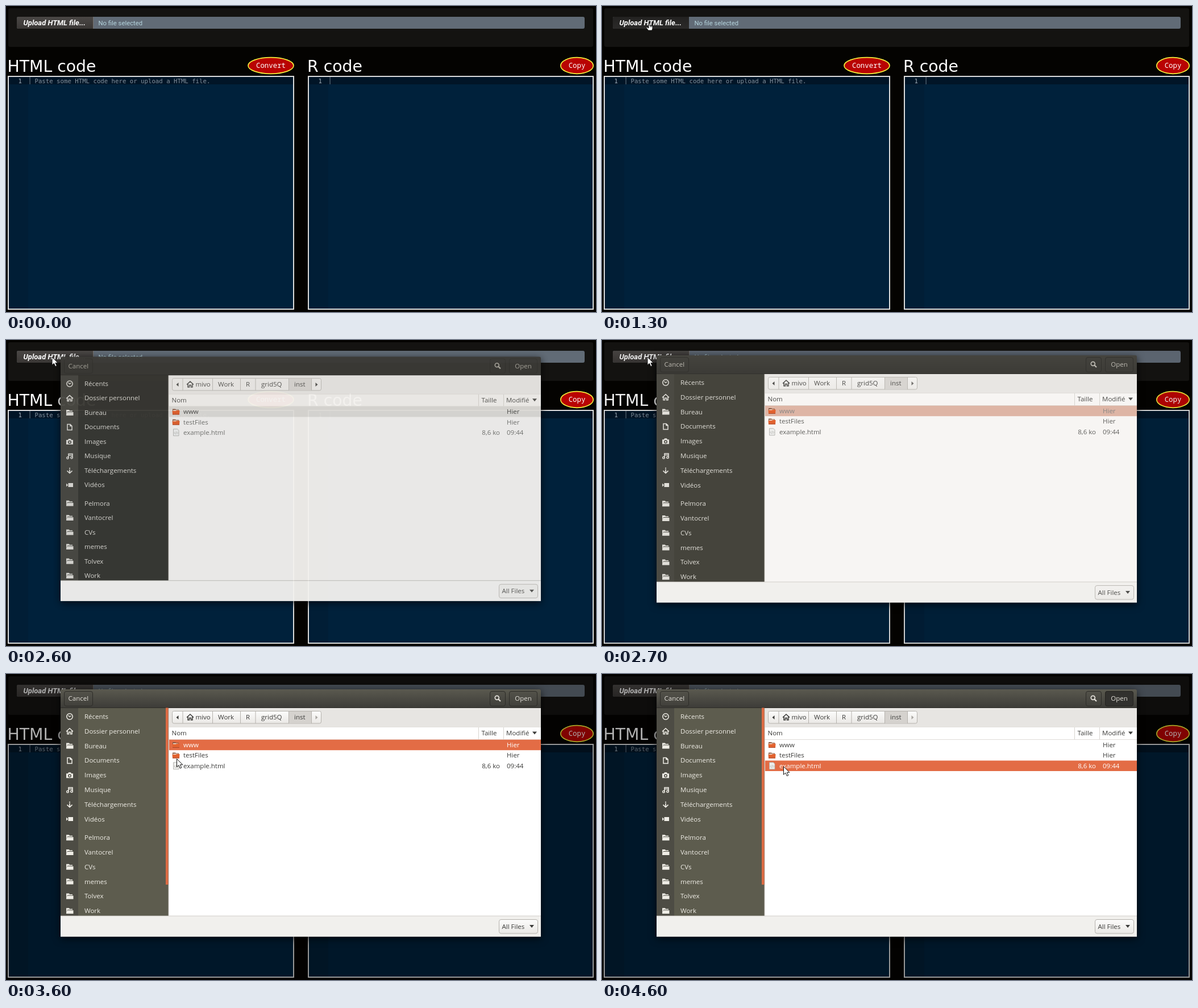
An HTML page that plays this animation: 1038x539 px, repeating every 8 s.

```html
<!DOCTYPE html>
<html lang="en">
<head>
<meta charset="utf-8">
<title>Upload a file</title>
<style>
html, body { margin: 0; width: 100%; height: 100%; overflow: hidden; background: #040301; }
svg { display: block; width: 100vw; height: 100vh; }
text { white-space: pre; }
.ui { font: 11.5px "Open Sans", "Noto Sans", sans-serif; }
.title { font: 28.3px "DejaVu Sans", sans-serif; fill: #fff; }
.code { font: 10.7px "DejaVu Sans Mono", monospace; }
.pill { font: 12.4px "Noto Sans Mono", monospace; fill: #fff; text-anchor: middle; }
.file { font: 11.3px Roboto, sans-serif; fill: #b4d3dc; }
.upload { font: italic bold 13px Roboto, sans-serif; fill: #fff; }
</style>
</head>
<body>
<svg id="stage" viewBox="0 0 1038 539" preserveAspectRatio="none"></svg>
<script>
const LOOP = 8000, STEP = 100;

const rect = (x, y, w, h, fill, more = '') =>
  `<rect x="${x}" y="${y}" width="${w}" height="${h}" fill="${fill}" ${more}/>`;
const text = (x, y, s, cls, more = '') => `<text x="${x}" y="${y}" class="${cls}" ${more}>${s}</text>`;
const path = (d, more = '') => `<path d="${d}" ${more}/>`;
const at = (x, y, body) => `<g transform="translate(${x} ${y})">${body}</g>`;
const gradient = (id, top, bottom) =>
  `<linearGradient id="${id}" x2="0" y2="1"><stop stop-color="${top}"/><stop offset="1" stop-color="${bottom}"/></linearGradient>`;

// ---- page ----
function editor(x, w, hint) {
  return rect(x + 1, 124, w - 2, 410, '#00213b', 'stroke="#dcdcdc" stroke-width="2"') +
    rect(x + 2, 125, 34, 408, '#011e36') +
    rect(x + 2, 125, w - 4, 13, '#011527') +
    text(x + 18.5, 135.5, '1', 'code', 'fill="#a3b0bc"') +
    rect(x + 38.5, 125, 1.2, 13, '#5b6a78') +
    text(x + 47.5, 135.5, hint, 'code', 'fill="#84919e"');
}

function pill(cx, rx, label) {
  return `<ellipse cx="${cx}" cy="105" rx="${rx}" ry="14.3" fill="#b90303" stroke="#f4ee3c" stroke-width="1.7"/>` +
    text(cx, 109.3, label, 'pill');
}

function page() {
  const left = 'M22 19H153V40H22Q19 40 19 37V22Q19 19 22 19Z';
  return rect(0, 0, 1038, 539, '#040301') +
    rect(4, 4, 1029, 68, '#141311', 'rx="3"') +
    rect(19, 19, 999, 21, '#616b76', 'rx="3"') +
    path(left, 'fill="url(#btn)"') +
    path(left, 'fill="url(#btnHover)" id="hover"') +
    rect(153, 19, 1, 21, '#756f69', 'id="seam"') +
    text(30.5, 34, 'Upload HTML file...', 'upload') +
    text(162.5, 33.8, 'No file selected', 'file') +
    text(2.5, 116, 'HTML code', 'title') + text(530, 116, 'R code', 'title') +
    pill(466, 40, 'Convert') + pill(1004.5, 28.7, 'Copy') +
    editor(3, 504, 'Paste some HTML code here or upload a HTML file.') +
    editor(531, 503, '');
}

// ---- icons, centred on 0,0 ----
const stroked = (d, w = 1.5) => path(d, `fill="none" stroke="currentColor" stroke-width="${w}"`);
const solid = d => path(d, 'fill="currentColor" fill-rule="evenodd"');
const icons = {
  clock: '<circle r="5.2" fill="none" stroke="currentColor" stroke-width="1.5"/>' + stroked('M-2.5 -2L0 .5L2.5 -1.5', 1.3),
  home: stroked('M-6 .5L0 -5L6 .5M-4 -1V5H-1.5V1.5H1.5V5H4V-1'),
  folder: solid('M-6 -5H-1L0 -3.5H5V-2H-4L-6 3ZM-4 -1H6.5V5H-6V3Z'),
  doc: stroked('M-4 -5H1L4 -2V5H-4ZM1 -5V-2H4'),
  camera: solid('M-6 -3H-3L-2 -5H2L3 -3H6V5H-6ZM0 -2A3 3 0 1 0 0 4A3 3 0 1 0 0 -2ZM0 -.5A1.5 1.5 0 1 1 0 2.5A1.5 1.5 0 1 1 0 -.5Z'),
  music: stroked('M-2 3V-4H5V2.5M-2 -1.5H5') +
    '<circle cx="-3.5" cy="3.3" r="1.8" fill="none" stroke="currentColor" stroke-width="1.4"/><circle cx="3.5" cy="2.8" r="1.8" fill="none" stroke="currentColor" stroke-width="1.4"/>',
  down: stroked('M0 -5V-3M0 -2V4M-4.5 .5L0 4.7L4.5 .5', 1.7),
  video: solid('M-2.5 -3.5H6V3.5H-2.5ZM-6 -3L-2.8 0L-6 3Z'),
  search: '<circle cx="-1.2" cy="-1.2" r="3.5" fill="none" stroke="currentColor" stroke-width="1.7"/>' + stroked('M1.5 1.5L5 5', 2.2)
};
const icon = (name, x, y, color) => at(x, y, `<g color="${color}">${icons[name]}</g>`);

const folderIcon = path('M-6 -5H-1L0 -4H5V4H-6Z', 'fill="#8c5a45"') + rect(-5, -3, 9, 3, '#f6e2d0') +
  path('M-6.5 -1.5H0L1 -2.5H6.5L6 5H-6Z', 'fill="#e2622f"') + rect(-6, 4, 12, 1, '#a8482b');
const fileIcon = path('M-4.5 -6H2.5L5 -3.5V6H-4.5Z', 'fill="#eeeeec" stroke="#aaa8a4" stroke-width=".8"') +
  stroked('M-1.5 -1L-3 1L-1.5 3M2 -1L3.5 1L2 3M.8 -1.5L-.3 3.5', .7);

const places = [
  ['clock', 'Récents'], ['home', 'Dossier personnel'], ['folder', 'Bureau'], ['doc', 'Documents'],
  ['camera', 'Images'], ['music', 'Musique'], ['down', 'Téléchargements'], ['video', 'Vidéos'],
  ...['Pelmora', 'Vantocrel', 'CVs', 'memes', 'Tolvex', 'Work'].map(s => ['folder', s])
];
const files = [['www', '', 'Hier'], ['testFiles', '', 'Hier'], ['example.html', '8,6 ko', '09:44']];

const active = {
  head: 'url(#head)', headText: '#e4e1da', edge: '#2d2c28', face: 'url(#face)', strip: '#4d4c44', side: '#5d5c4e',
  sideText: '#efede6', bar: '#e7e5e2', list: '#ffffff', foot: '#f1f0ed', ink: '#3b3b39', rowInk: '#3b3b39',
  pick: '#e36c45', pickInk: '#ffffff', button: 'url(#light)', chosen: '#d5d2ce', line: '#b5b2ad', dim: '#aaa7a2'
};
const inactive = {
  head: '#3b3a36', headText: '#a9a69d', edge: '#353430', face: '#3b3a36', strip: '#4a4943', side: '#393833',
  sideText: '#dbd9d3', bar: '#e9e7e4', list: '#f3f1ee', foot: '#f2f1ee', ink: '#5b5a57', rowInk: '#747370',
  pick: '#dcdad6', pickInk: '#4b4a47', button: '#eeece9', chosen: '#dad7d3', line: '#c0bdb8', dim: '#5b5a57'
};

function fileRow(i, c, picked) {
  const y = 125 + i * 18.4, [name, size, date] = files[i];
  const ink = `fill="${picked ? c.pickInk : c.rowInk}"`;
  return (picked ? rect(287, y - 9.3, 654, 18.5, c.pick) : '') +
    at(299, y, `<g color="#aaa8a4">${i < 2 ? folderIcon : fileIcon}</g>`) +
    text(312, y + 4, name, 'ui', ink) +
    text(869, y + 4, size, 'ui', ink + ' text-anchor="end"') + text(881, y + 4, date, 'ui', ink);
}

const fileRows = (c, pick) => files.map((_, i) => fileRow(i, c, i === pick)).join('');

function sidebar(c) {
  return rect(96, 59.5, 190, 366.5, c.side) + rect(96, 59.5, 31, 366.5, c.strip) +
    places.map(([name, label], i) => {
      const y = 75 + i * 25.8 + (i > 7 ? 6.8 : 0);
      return icon(name, 112, y, c.sideText) + text(138, y + 4, label, 'ui', `fill="${c.sideText}"`);
    }).join('');
}

function headButton(x, w, body, c, id = '') {
  return rect(x + .5, 30.5, w - 1, 26, c.face, `rx="3.5" stroke="${c.edge}" ${id}`) + body;
}

function header(c, id) {
  const label = (x, s) => text(x, 47.2, s, 'ui', `fill="${c.headText}" text-anchor="middle"`);
  return path('M96 59.5V30Q96 27 99 27H938Q941 27 941 30V59.5Z', `fill="${c.head}"`) +
    rect(96, 59, 845, 1, c.edge) +
    headButton(102, 51, label(127.3, 'Cancel'), c) +
    headButton(851, 28, icon('search', 865, 43, c.headText), c) +
    headButton(885, 50, '', c) +
    rect(885.5, 30.5, 49, 26, '#32312e', `rx="3.5" stroke="#252420" opacity="0" ${id}`) + label(910, 'Open');
}

function pathBar(c) {
  const ink = `fill="${c.ink}"`;
  const crumbs = [[333.5, 'mivo'], [373, 'Work'], [422, 'R'], [449, 'grid5Q'], [507, 'inst']];
  return rect(286, 59.5, 655, 34, c.bar) +
    rect(292.5, 65.5, 262, 21.5, c.button, `rx="3" stroke="${c.line}"`) +
    rect(497, 66, 40, 20.5, c.chosen) +
    [310.5, 363, 412, 438.5, 497, 537].map(x => rect(x, 66, 1, 21, c.line)).join('') +
    path('M303.5 73V80L299.5 76.5Z', ink) + path('M544.5 73V80L548.5 76.5Z', `fill="${c.dim}"`) +
    icon('home', 324, 76, c.ink) +
    crumbs.map(([x, s]) => text(x, 80.3, s, 'ui', ink)).join('');
}

function dialog(c, id, selection) {
  const ink = `fill="${c.ink}"`;
  return rect(286, 93, 655, 333, c.list) + pathBar(c) +
    rect(286, 93, 655, 22, c.list) + rect(286, 93, 655, .7, '#d7d4cf') + rect(286, 115, 655, .8, '#d7d4cf') +
    [831, 875].map(x => rect(x, 94, 1, 21, '#d7d4cf')).join('') +
    text(291.5, 108, 'Nom', 'ui', ink) + text(836.5, 108, 'Taille', 'ui', ink) + text(880, 108, 'Modifié', 'ui', ink) +
    path('M926 101.5H934L930 106.5Z', ink) +
    selection + sidebar(c) + rect(285.5, 59.5, 1, 366.5, '#c5c2bc') + header(c, id) +
    rect(96, 426, 845, 36.5, c.foot) + rect(96, 425.7, 845, .8, '#c9c6c0') +
    rect(867.5, 432.5, 68, 24.5, c.button, `rx="3.5" stroke="${c.line}"`) +
    text(872.5, 448.6, 'All Files', 'ui', ink) + path('M921 442H929L925 447Z', ink);
}

const arrow = path('M0 0V14.2L3.4 11.2L5.8 16.6L8.3 15.5L5.9 10.3H10.3Z', 'fill="#fff" stroke="#111" stroke-width="1"');
const hand = path('M-1 1Q0 -.8 1.2 1V5H5.3L6 6V10L4.8 13H-1.5L-5 8.5Q-4.5 6.8 -2.5 8L-1 9Z',
  'fill="#fff" stroke="#111" stroke-width="1"') + stroked('M2.2 5.5V7.5M4 5.5V7.5', .7);

const stage = document.getElementById('stage');
stage.innerHTML = '<defs>' + gradient('btn', '#4a4745', '#3a3735') + gradient('btnHover', '#232221', '#2b2a29') +
  gradient('head', '#5a594f', '#3d3c38') + gradient('face', '#53524a', '#41403b') + gradient('light', '#fcfcfb', '#eae8e5') +
  '</defs>' + page() + rect(0, 0, 1038, 539, '#000', 'id="shade"') +
  '<g id="dialog" style="filter:drop-shadow(0 3px 7px rgba(0,0,0,.7))">' +
  dialog(inactive, '', fileRows(inactive, 0)) +
  '<g id="focused">' +
  dialog(active, 'id="open"', `<g id="before">${fileRows(active, 0)}</g><g id="after">${fileRows(active, 2)}</g>`) +
  rect(281, 59.5, 4.5, 311.5, '#dc6b44', 'id="scroll"') + '</g></g>' +
  `<g id="cursor"><g id="arrow">${arrow}</g><g id="hand">${hand}</g></g>`;

// ---- motion ----
const parts = {};
stage.querySelectorAll('[id]').forEach(n => parts[n.id] = n);
const ramp = (t, from, to) => Math.min(1, Math.max(0, (t - from) / (to - from)));
const fade = (id, value) => parts[id].setAttribute('opacity', value);
const show = (id, on) => parts[id].setAttribute('display', on ? 'inline' : 'none');
const move = (id, x, y) => parts[id].setAttribute('transform', `translate(${x} ${y})`);
const smooth = p => p * p * (3 - 2 * p);
const easeOut = p => 1 - (1 - p) ** 2;

// time, x, y, easing into this point
const track = [
  [900, 228, 9, easeOut], [1300, 83, 30, easeOut], [2200, 83, 30, smooth], [2300, 81, 30, smooth],
  [2600, 81, 30, smooth], [2700, 80, 30, smooth], [3100, 80, 30, smooth],
  [3600, 300.5, 149.5, smooth], [4000, 319.5, 163, smooth]
];

function pointer(t) {
  let [, x, y] = track[0];
  for (let i = 1; i < track.length; i++) {
    const [end, nx, ny, ease] = track[i], p = ease(ramp(t, track[i - 1][0], end));
    x += (nx - x) * p;
    y += (ny - y) * p;
  }
  return [x, y];
}

function draw(t) {
  t = Math.floor(t / STEP) * STEP;
  const [x, y] = pointer(t);
  const pointing = t >= 900 && t < 2300 && x < 153;
  show('cursor', t >= 900);
  show('hand', pointing);
  show('arrow', !pointing);
  move('cursor', x, y);

  const hover = t < 2200 ? (pointing ? ramp(t, 900, 1200) : 0) : 1 - ramp(t, 2200, 2500);
  fade('hover', hover);
  fade('seam', 1 - hover);
  fade('shade', .31 * ramp(t, 2600, 3100));

  const opening = t < 2700;
  show('dialog', t >= 2600);
  fade('dialog', opening ? .96 : 1);
  parts.dialog.setAttribute('transform', `translate(0 244.7) scale(1 ${opening ? .988 : 1}) translate(0 -244.7)`);
  fade('focused', ramp(t, 2600, 2900));
  fade('scroll', ramp(t, 3200, 3500));

  const picked = t >= 4400;
  show('before', !picked);
  show('after', picked);
  fade('open', ramp(t, 4300, 4600));
}

const start = performance.now();
function tick() {
  draw((performance.now() - start) % LOOP);
  requestAnimationFrame(tick);
}
draw(0);
requestAnimationFrame(tick);
</script>
</body>
</html>
```
